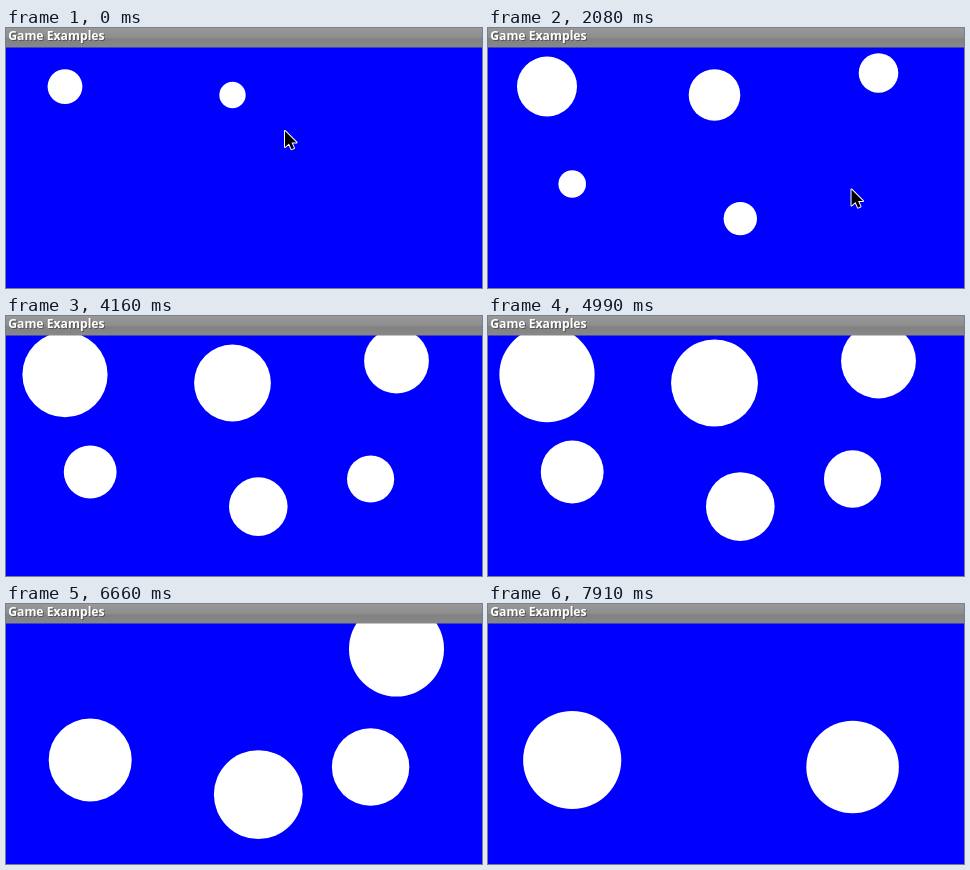
Animation of 476x260 px, one loop 8 s. Source, as an HTML page with a canvas:

```html
<!DOCTYPE html>
<html lang="en">
<head>
<meta charset="utf-8">
<title>Growing circles</title>
<style>
  html, body { margin: 0; width: 100%; height: 100%; overflow: hidden; background: #00f; }
  canvas { display: block; width: 476px; height: 260px; }
</style>
</head>
<body>
<canvas id="stage" width="476" height="260"></canvas>
<script>
const ctx = document.getElementById('stage').getContext('2d');
const LOOP = 8000, STEP = 208.1, BAR = 19.5;
const GROWTH = 1.26, MAX_RADIUS = 50.8;

// radius is the size extrapolated to step 0; born is the first visible step
const circles = [
  { x: 59, y: 58.6, radius: 17.4, born: 0 },
  { x: 226.5, y: 67, radius: 13.2, born: 0 },
  { x: 390.5, y: 45, radius: 7.2, born: 4 },
  { x: 252.3, y: 190.6, radius: 4.1, born: 7 },
  { x: 84.2, y: 156, radius: 1.2, born: 9 },
  { x: 364.6, y: 163, radius: -1.6, born: 11 }
];

// pointer position at each step; it rests on the last one, then leaves
const pointerPath = [
  [279, 103], [325, 80], [368, 56], [390, 45], [372, 66], [310, 140],
  [252, 190], [180, 178], [84, 156], [210, 158], [363.5, 161.5]
];
const POINTER_GONE = 19;
const arrow = new Path2D('M0 0V16L4 12.5L6.5 18.2L9 17.1L6.5 11.5H11.5Z');

const barFill = ctx.createLinearGradient(0, 0, 0, BAR);
[[0, '#999'], [0.5, '#8d8d8d'], [0.55, '#818181'], [1, '#888']]
  .forEach(([at, color]) => barFill.addColorStop(at, color));

function drawCircle({ x, y, radius, born }, step) {
  const r = radius + GROWTH * step;
  if (step < born || r > MAX_RADIUS) return;
  ctx.beginPath();
  ctx.arc(x, y, r, 0, Math.PI * 2);
  ctx.fill();
}

function drawPointer(step) {
  if (step >= POINTER_GONE) return;
  const [x, y] = pointerPath[Math.min(step, pointerPath.length - 1)];
  ctx.save();
  ctx.translate(x, y);
  ctx.lineJoin = 'round';
  ctx.lineWidth = 2;
  ctx.strokeStyle = '#fff';
  ctx.stroke(arrow);
  ctx.fillStyle = '#000';
  ctx.fill(arrow);
  ctx.restore();
}

function drawTitleBar() {
  ctx.fillStyle = barFill;
  ctx.fillRect(0, 0, 476, BAR);
  ctx.font = 'bold 12.2px "Open Sans", "Noto Sans", sans-serif';
  ctx.fillStyle = '#555';
  ctx.fillText('Game Examples', 3.2, 13);
  ctx.fillStyle = '#fff';
  ctx.fillText('Game Examples', 2.2, 12);
}

function draw(now) {
  // steps are held and change on a 10 ms clock
  const time = Math.floor((now % LOOP) / 10) * 10;
  const step = Math.ceil((time + 7.5) / STEP) - 1;
  ctx.fillStyle = '#00f';
  ctx.fillRect(0, 0, 476, 260);
  ctx.fillStyle = '#fff';
  circles.forEach(circle => drawCircle(circle, step));
  drawTitleBar();
  drawPointer(step);
}

const start = performance.now();
function tick() {
  draw(performance.now() - start);
  requestAnimationFrame(tick);
}
tick();
</script>
</body>
</html>
```
